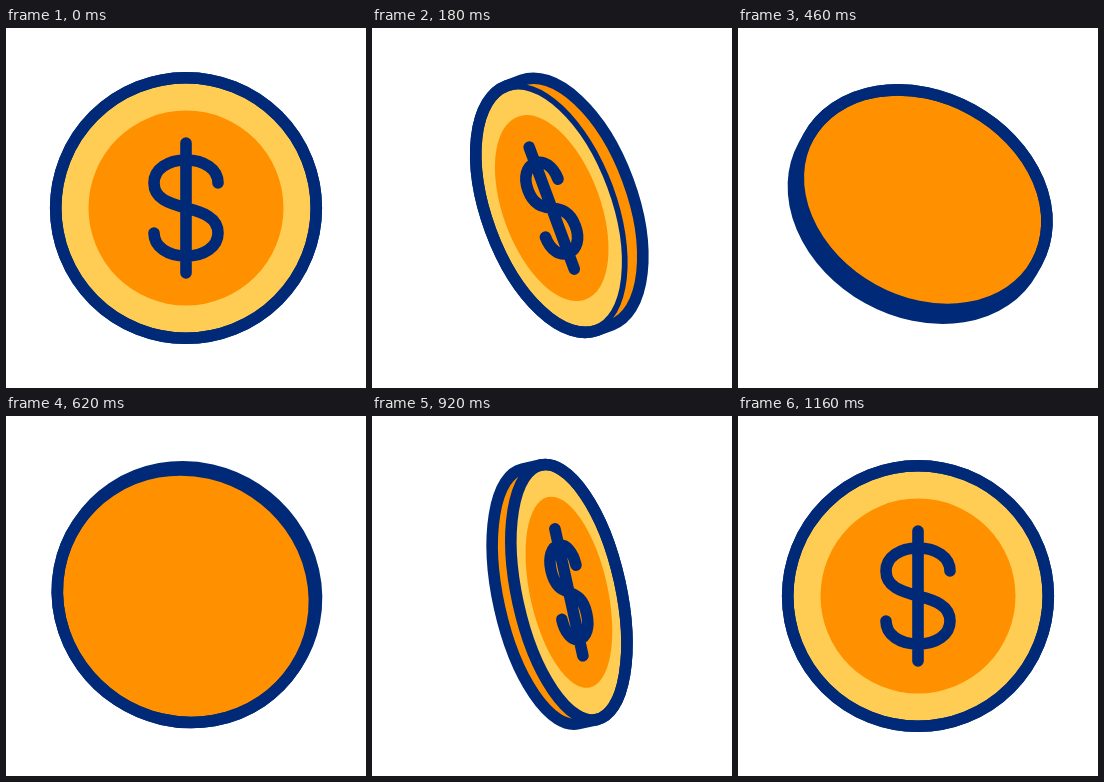
An HTML page with a canvas that plays this animation: 360 px wide and 360 px high, repeating every 1.4 s.

```html
<!DOCTYPE html>
<html>
<head>
<meta charset="utf-8">
<title>Flipping coin</title>
<style>
  html, body { margin: 0; width: 360px; height: 360px; overflow: hidden; background: #fff; }
  canvas { display: block; }
</style>
</head>
<body>
<canvas id="stage" width="360" height="360"></canvas>
<script>
const ctx = document.getElementById('stage').getContext('2d');
const LOOP = 1400, STEP = 20, HALF = 570, END = 1160;
const R = 130.3, INNER = 97.5, RAD = Math.PI / 180;
const NAVY = '#002a77', YELLOW = '#ffcd53', ORANGE = '#ff9100';
const dollar = new Path2D('M0-65V65M32-25C32-39 18-48 0-48S-32-39-32-25C-32-8-14-4 0 0S32 8 32 25C32 39 18 48 0 48S-32 39-32 25');

const progress = (t, from, to) => Math.min(1, Math.max(0, (t - from) / (to - from)));
const ease = u => (1 - Math.cos(Math.PI * u)) / 2;
// rises from 0 to 1 between a and b, falls back between c and d
const swell = (t, a, b, c, d) => ease(progress(t, a, b)) - ease(progress(t, c, d));

function spinAt(t) {
  const u = progress(t, 0, HALF), v = progress(t, HALF, END);
  return 180 * (u + v) + 3.5 * Math.sin(2 * Math.PI * u) + 7 * Math.sin(Math.PI * v);
}
const tiltAt = t => 61 * swell(t, 0, 460, 520, 1090);
const depthAt = t => 27 * swell(t, 0, 320, 320, 560) + 25.5 * swell(t, 560, 800, 800, END);

function disc(x, r, squash) {
  const path = new Path2D();
  path.ellipse(x, 0, r * squash, r, 0, 0, 2 * Math.PI);
  return path;
}

function body(depth, squash) {
  const path = new Path2D(), q = Math.PI / 2;
  path.ellipse(depth, 0, R * squash, R, 0, -q, q);
  path.ellipse(0, 0, R * squash, R, 0, q, 3 * q);
  path.closePath();
  return path;
}

function fill(path, color) {
  ctx.fillStyle = color;
  ctx.fill(path, 'evenodd');
}

function draw(t) {
  const spin = spinAt(t), depth = depthAt(t);
  const c = Math.cos(spin * RAD), squash = Math.abs(c);
  const front = c > 0, firstHalf = t < HALF;
  const x = front === firstHalf ? 0 : depth;
  const hull = body(depth, squash), face = disc(x, R, squash);

  ctx.setTransform(1, 0, 0, 1, 0, 0);
  ctx.clearRect(0, 0, 360, 360);
  ctx.translate(180, 180);
  ctx.rotate(-tiltAt(t) * RAD);
  ctx.translate(-0.12 * depth * t / END, 0);
  ctx.lineWidth = 11.6;
  ctx.lineCap = ctx.lineJoin = 'round';
  ctx.strokeStyle = NAVY;

  fill(hull, ORANGE);
  fill(face, front ? YELLOW : ORANGE);
  ctx.stroke(face);
  if (front) {
    fill(disc(x, INNER, squash), ORANGE);
    // squash the sign but keep its line weight
    const sign = new Path2D();
    sign.addPath(dollar, new DOMMatrix([c, 0, 0, 1, x, 0]));
    ctx.stroke(sign);
    if (firstHalf) {
      // the rim overlaps the outer half of the face outline
      const rim = new Path2D(hull);
      rim.addPath(face);
      fill(rim, ORANGE);
    }
  }
  ctx.stroke(hull);
}

function tick() {
  const t = performance.now() % LOOP;
  draw(Math.floor(t / STEP) * STEP);
  requestAnimationFrame(tick);
}
tick();
</script>
</body>
</html>
```
